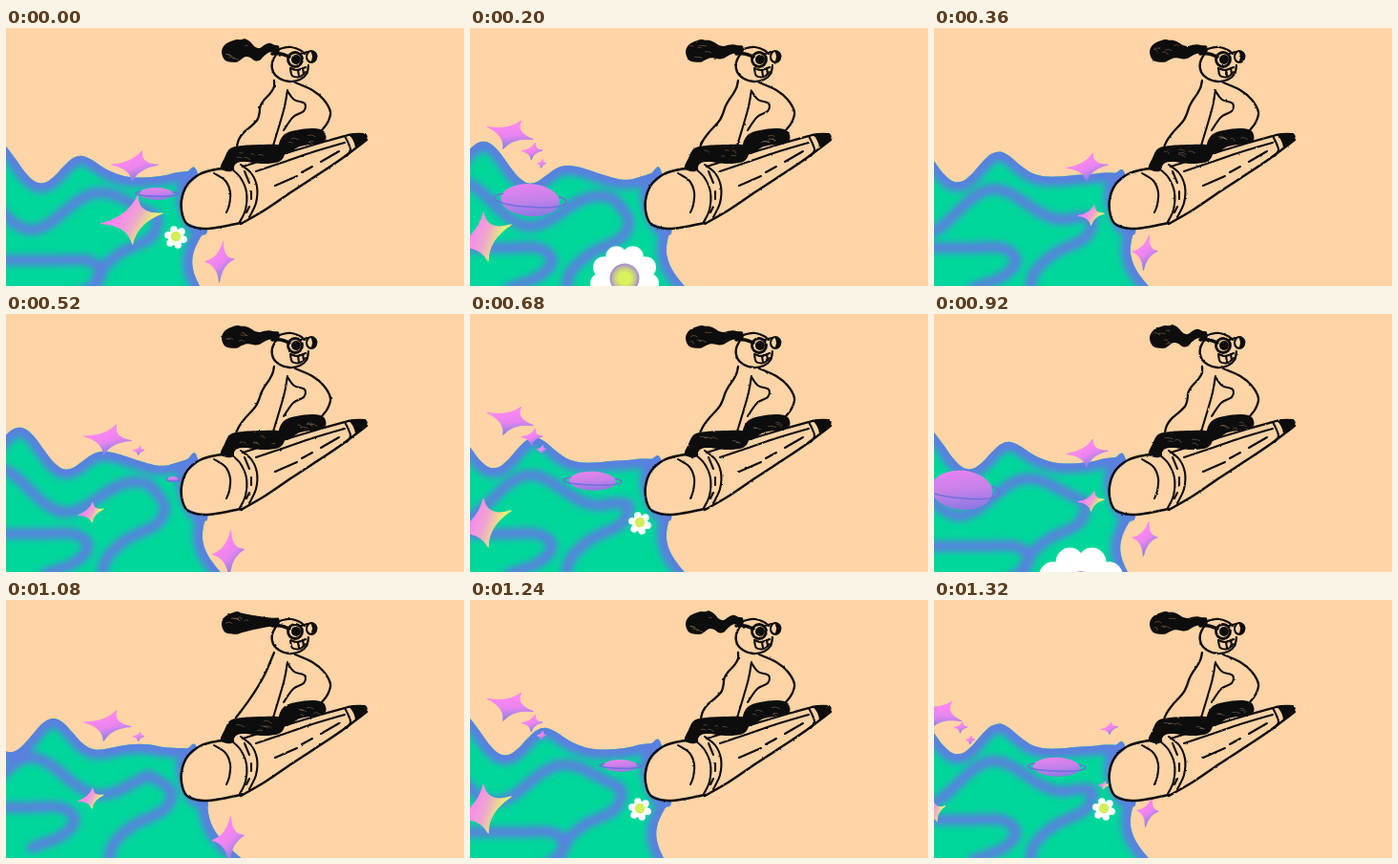
Write an HTML page that moves like this. It is 480x270 px and loops after 1.36 s.

```html
<!DOCTYPE html>
<html lang="en">
<head>
<meta charset="utf-8">
<title>Pencil rider</title>
<style>
html, body { margin: 0; width: 100%; height: 100%; overflow: hidden; background: #ffd4a6; }
svg { display: block; width: 100vw; height: 100vh; }
.ink { fill: none; stroke: #0b0909; stroke-linecap: round; stroke-linejoin: round; }
.solid { fill: #0b0909; }
.skin { fill: #ffd4a6; }
.soft { fill: none; stroke: #5a80df; stroke-linecap: round; stroke-linejoin: round; }
.scratch { fill: none; stroke: #ffd4a6; stroke-width: .6; opacity: .5; }
</style>
</head>
<body>
<svg viewBox="0 0 480 270">
  <defs>
    <filter id="blur" filterUnits="userSpaceOnUse" x="-60" y="60" width="360" height="270"><feGaussianBlur stdDeviation="3.6"/></filter>
    <filter id="rough" filterUnits="userSpaceOnUse" x="170" y="0" width="230" height="225">
      <feTurbulence id="grain" type="fractalNoise" baseFrequency=".22" numOctaves="2"/>
      <feDisplacementMap in="SourceGraphic" scale="1.8" xChannelSelector="R" yChannelSelector="G"/>
    </filter>
    <clipPath id="edge"><path id="edgePath"/></clipPath>
    <linearGradient id="pink" x1=".2" y1="0" x2=".8" y2="1">
      <stop offset=".3" stop-color="#fa86f2"/><stop offset=".55" stop-color="#e884ef"/><stop offset=".85" stop-color="#7f82e6"/>
    </linearGradient>
    <linearGradient id="sun" x1="0" y1=".1" x2="1" y2=".7">
      <stop offset=".35" stop-color="#fb86ed"/><stop offset=".58" stop-color="#eea6cf"/><stop offset=".8" stop-color="#e9ee78"/>
    </linearGradient>
    <linearGradient id="globe" x1=".3" y1="0" x2=".6" y2="1">
      <stop offset="0" stop-color="#e882ee"/><stop offset=".5" stop-color="#c781ea"/><stop offset="1" stop-color="#8b78e2"/>
    </linearGradient>
    <radialGradient id="pollen">
      <stop offset=".4" stop-color="#d9f25c"/><stop offset=".75" stop-color="#c4c390"/><stop offset="1" stop-color="#a083dc"/>
    </radialGradient>
  </defs>
  <rect width="480" height="270" fill="#ffd4a6"/>
  <g clip-path="url(#edge)">
    <rect width="300" height="270" fill="#00d79b"/>
    <g filter="url(#blur)">
      <path id="rim" class="soft" stroke-width="20"/>
      <path id="veins" class="soft" stroke-width="11"/>
    </g>
  </g>
  <g id="bits"></g>
  <g filter="url(#rough)">
    <g id="pencil"></g>
    <g id="rider"></g>
  </g>
</svg>
<script>
const LOOP = 1360, STEP = 80, TAU = 2 * Math.PI;
const { sin, cos, exp, min, max, round } = Math;
const el = id => document.getElementById(id);
const smooth = u => u * u * (3 - 2 * u);

function range(a, b, step, f) {
  const out = [];
  for (let v = a; step > 0 ? v <= b : v >= b; v += step) out.push(f(v));
  return out;
}

function random(seed) {
  return () => (seed = (seed * 16807 + 11) % 2147483647) / 2147483647;
}

// Smooth curve through [x, y] pairs or an "x,y x,y" string
function curve(pts, closed) {
  const p = typeof pts === 'string' ? pts.split(' ').map(s => s.split(',').map(Number)) : pts;
  const n = p.length;
  const at = i => closed ? p[(i + n) % n] : p[max(0, min(n - 1, i))];
  let d = 'M' + p[0];
  for (let i = 0; i < (closed ? n : n - 1); i++) {
    const [a, b, c, e] = [at(i - 1), at(i), at(i + 1), at(i + 2)];
    const c1 = [0, 1].map(k => b[k] + (c[k] - a[k]) / 6);
    const c2 = [0, 1].map(k => c[k] - (e[k] - b[k]) / 6);
    d += `C${c1} ${c2} ${c}`;
  }
  return d + (closed ? 'Z' : '');
}
const ink = (pts, w = 2.1) => `<path class="ink" stroke-width="${w}" d="${curve(pts)}"/>`;
const blob = pts => `<path class="solid" d="${curve(pts, true)}"/>`;

// Light gaps left by the scribbled fill
function scratches(x, y, w, h, rnd) {
  return range(1, 5, 1, () => {
    const a = x + rnd() * w, b = y + rnd() * h;
    return `<path class="scratch" d="M${a},${b}q${2 + rnd() * 3},${-3 * rnd()} ${4 + rnd() * 5},${rnd() * 3}"/>`;
  }).join('');
}

// Slime: waves run left, four steps per cycle
function drawSlime(n) {
  const turn = TAU * n / 4, swing = cos(turn);
  const crest = 93 - 24.5 * n + 9 * sin(turn - 1.1);
  const top = range(-40, 200, 10, x => {
    const base = 138 + .11 * x - .25 * max(0, x - 165);
    const amp = 3 + 18 / (1 + exp((x - 85) / 14));
    return [x, base - amp * cos(TAU * (x - crest) / 98)];
  });
  const side = range(208, 298, 10, y => {
    const d = y - 208;
    return [211 - 14 * sin(d * Math.PI / 70) + d * (.3 - .35 * swing), y];
  });
  const flow = x => [x, 188 + 26 * (1 - x / 260) * cos(TAU * (x - 177 + 37 * n) / 148)];
  const bend = 166 - 7 * swing, hookX = 86 + 14 * swing, hookY = 230 + 13 * swing;
  const vein = range(-20, 150, 10, flow);
  const arm = [flow(150), [bend, 200], [bend - 8, 220], [bend - 40, 236], [bend - 62, 258], [bend - 66, 290]];
  const hook = [[-20, hookY], [hookX - 50, hookY], [hookX - 15, hookY], [hookX, hookY + 13], [hookX - 14, hookY + 30], [hookX - 45, hookY + 42]];
  el('edgePath').setAttribute('d', curve(top.concat(side)) + 'L-40,300Z');
  el('rim').setAttribute('d', curve(top) + curve([[196, 152], [188, 175], [198, 205], ...side]));
  el('veins').setAttribute('d', curve(vein) + curve(arm) + curve(hook));
}

function star(x, y, w, h, turn, paint = 'pink') {
  const tips = [[-.5, -.02], [.15, -.5], [.5, -.06], [-.04, .5]].map(([a, b]) => [a * w, b * h]);
  let d = 'M' + tips[0];
  tips.forEach((t, i) => {
    const n = tips[(i + 1) % 4];
    d += `Q${(t[0] + n[0]) * .16},${(t[1] + n[1]) * .16} ${n}`;
  });
  return `<path d="${d}Z" transform="translate(${x} ${y}) rotate(${turn})" fill="url(#${paint})" stroke="url(#${paint})" stroke-linejoin="round"/>`;
}

// One burst of stars, thrown back from the pencil
function burst(a) {
  const w = 50 * (1 - .64 * exp(-1.6 * a));
  let s = star(184 - 22 * a - 1.3 * a * a, 129 + 18 * cos(.9 * (a - 1.4)), w, w * .66, 5 * a - 8);
  if (a > 2) {
    const x = 139 - 37 * (a - 3), y = 143 - 14 * sin((a - 3) * .8), m = 12 + 11 * sin((a - 3) * .98);
    s += star(x, y, m, m * .8, 0);
    if (a > 3) s += star(x + 10, y + 13, 9, 9, 0);
  }
  const u = smooth(a / 6), b = (40 + 26 * cos(TAU * (a - 2) / 3)) * min(1, .4 + .6 * a);
  s += star(178 - 178 * u, 194 + 28 * u, b, b * .75, -4 * a, 'sun');
  if (a < 4) {
    const t = 22 + 4 * a;
    s += star(224 - 6 * a + 3 * a * a, 222 + 15 * a - 1.8 * a * a, t, t * 1.4, 6 - 4 * a);
  }
  return s;
}

function planet(p) {
  if (p > 5) return '';
  const x = 175 - 35 * p * p / (p + 1), y = 173 + .45 * p * p;
  const rx = 34 * (1 - .83 * exp(-.55 * p)), ry = 3 + 3.5 * p, r = rx * 1.3, q = max(2, ry * .42);
  return `<g transform="translate(${x} ${y}) rotate(${p})"><ellipse rx="${rx}" ry="${ry}" fill="url(#globe)"/>
    <path d="M${-rx * .92},${-q * .7}C${-r * 1.15},${-q * .2} ${-r},${q} 0,${q}S${r * 1.15},${-q * .2} ${rx * .96},${-q * .8}" fill="none" stroke="#6f70dc" stroke-width="1.5"/></g>`;
}

function flower(p) {
  if (p < 1 || p > 5) return '';
  const g = max(0, p - 2), r = 12 + 12 * g, x = 178 - 8 * g, y = 219 + 18 * g + 2 * g * g, n = g ? 9 : 6;
  const petals = range(0, n - 1, 1, i => {
    const a = (i + .25) * TAU / n;
    return `<circle cx="${x + cos(a) * r * .7}" cy="${y + sin(a) * r * .7}" r="${r * .31}"/>`;
  });
  return `<g fill="#fff">${petals.join('')}<circle cx="${x}" cy="${y}" r="${r * .7}"/></g>
    <circle cx="${x}" cy="${y - 1}" r="${r * .43}" fill="${g ? 'url(#pollen)' : '#d3ee58'}"/>`;
}

el('pencil').innerHTML =
  `<path class="skin" d="M240,146L330,119 376,110 379,116 345,141 300,172 246,206 205,210 188,203 183,186 188,167 205,152Z"/>` +
  ink('238,147 220,148 203,153 190,164 184,180 185,196 191,206 207,210 226,208 246,204', 2.5) +
  ink('218,152 230,160 235,172 234,185 231,193') +
  ink('236,147 246,157 252,172 251,190 245,203') +
  ink('246,143 257,152 263,166 262,183 255,198') +
  ink('250,150 255,162') + ink('257,171 257,179') + ink('255,187 252,193') +
  ink('246,205 272,190 300,171 326,154 350,138 378,117', 2.5) +
  ink('248,145 290,132 330,120 359,112', 2.3) +
  ink('262,150 286,142 318,131 355,120') +
  ink('282,165 305,155') + ink('310,151 321,145') + ink('330,140 349,129') +
  ink('355,113 359,121 361,128 357,134') + ink('358,112 376,111') +
  `<path class="solid" d="M358,111Q367,109 376,110Q381,112 377,118L366,125Q365,116 358,111Z"/>`;

const head =
  ink('284,26 279,36 280,46 287,53 297,56 308,54 315,48 317,39', 2.3) +
  ink('283,24 290,21 299,20 308,23 313,27') + ink('279,27 288,27 297,30', 3.4) +
  `<circle class="ink" cx="303" cy="33" r="7.5" stroke-width="2.8"/><circle class="solid" cx="304" cy="33" r="5"/>` +
  `<ellipse class="ink" cx="320" cy="30" rx="5" ry="6" stroke-width="2.1"/><path class="solid" d="M319,24Q328,24 326,32Q324,37 319,36Q323,30 319,24Z"/>` +
  ink('309,27 316,25') +
  ink('298,42 305,44 314,41') + ink('298,42 300,50 308,51 314,46') + ink('306,44 307,50') + ink('311,42 312,48');

const feet =
  blob('225,147 229,136 235,126 248,123 270,122 289,123 292,132 286,140 270,142 250,140 241,142 236,150') +
  blob('286,124 291,112 304,107 322,105 333,108 335,117 326,121 308,124 294,132');

const limbs =
  ink('303,57 321,65 333,75 340,88 337,99 331,107', 2.3) +
  ink('295,66 302,75 313,79 312,87 301,93 291,107') +
  ink('295,65 292,82 287,100 280,123');

// Hair and back ripple together; curl is the ripple height
function drawRider(n) {
  const curl = 2.2 + 2.3 * cos(TAU * n / 4), rnd = random(n + 5);
  const hairAt = side => x => {
    const v = (286 - x) / 46;
    return [x, 23 + v + curl * sin(Math.PI * v) * cos(TAU * (x - 264) / 28) + side * (4 + 8 * v ** 1.5)];
  };
  const hair = [...range(286, 240, -5, hairAt(-1)), [230, 17], [226, 25], [230, 34], ...range(241, 286, 5, hairAt(1))];
  const back = range(0, 1.01, .1, u => [281 - 40 * u + 4 * sin(Math.PI * u) + .6 * curl * sin(13 * u), 55 + 68 * u]);
  el('rider').innerHTML =
    `<path class="skin" d="${curve(back)}L333,107L320,61L300,56Z"/>` +
    ink(back, 2.3) + limbs + feet + head + blob(hair) +
    scratches(230, 18, 22, 14, rnd) + scratches(240, 127, 40, 10, rnd) + scratches(296, 112, 28, 8, rnd);
}

function draw(slot) {
  const n = slot % 8, stage = (slot + 1) % 8;
  drawSlime(n);
  let s = planet(stage);
  for (let i = 0; i < 4; i++) {
    const age = slot - round(19 / 3 * i - 2);
    if (age >= 0 && age < 7) s += burst(age);
  }
  el('bits').innerHTML = s + flower(stage);
  el('grain').setAttribute('seed', n + 1);
  drawRider(n);
}

let last = -1;
const start = performance.now();
function tick() {
  const t = (performance.now() - start) % LOOP;
  const slot = Math.floor((t + STEP / 2) / STEP);
  if (slot !== last) draw(last = slot);
  requestAnimationFrame(tick);
}
tick();
</script>
</body>
</html>
```
